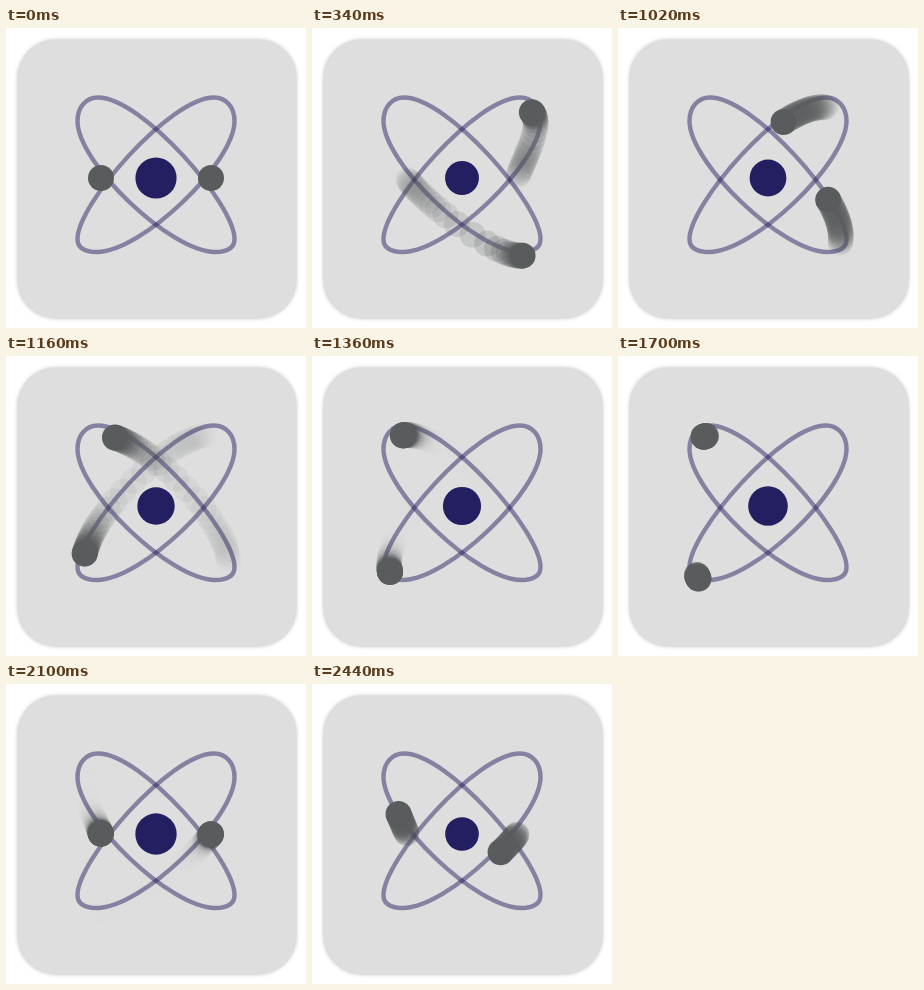
An HTML page with a canvas that plays this animation: 300x300 px, repeating every 2.46 s.

```html
<!DOCTYPE html>
<html lang="en">
<head>
<meta charset="utf-8">
<title>Atom</title>
<style>
  html, body { margin: 0; width: 100%; height: 100%; overflow: hidden; background: #fff; }
  .stage { position: relative; width: 300px; height: 300px; overflow: hidden; }
  .card {
    position: absolute; left: 11.5px; top: 11.5px; width: 278px; height: 278px;
    border-radius: 38px; background: #dedede; box-shadow: 0 0 4px rgba(0, 0, 0, .3);
  }
  svg, canvas { position: absolute; left: 0; top: 0; width: 300px; height: 300px; }
  .orbit { fill: none; stroke: #221c5f; stroke-opacity: .48; stroke-width: 4.4; }
</style>
</head>
<body>
<div class="stage">
  <div class="card"></div>
  <svg viewBox="0 0 300 300">
    <path id="orbit" class="orbit" d="M71.5 211C71.5 176 164 69.5 208 69.5C220 69.5 228.5 79 228.5 93C228.5 135 135.5 224 91 224C78 224 71.5 220 71.5 211Z"/>
    <use href="#orbit" transform="matrix(-1 0 0 1 300 0)"/>
    <circle id="nucleus" cx="150" cy="150" r="20.6" fill="#231f60"/>
  </svg>
  <canvas id="view" width="300" height="300"></canvas>
</div>
<script>
  const SIZE = 300, LOOP = 2460, BEAT = 2160;
  const STEP = 6, FADE = 55, TRAIL = 330;
  const ctx = document.getElementById('view').getContext('2d');
  const nucleus = document.getElementById('nucleus');

  // Home, far corner, near corner, home, with two handles in between.
  const left = [
    [95, 150], [110, 174], [212, 254],
    [221, 219], [238, 176], [130, 68],
    [88, 80], [66, 86], [79, 112],
    [95, 150]
  ];
  // The other electron runs the mirrored route the other way round.
  const right = left.map(([x, y]) => [SIZE - x, y]).reverse();
  const stops = [0, 595, 1560, 2140];

  const cubic = (s, a, b, c, d) => {
    const r = 1 - s;
    return r * r * r * a + 3 * r * r * s * b + 3 * r * s * s * c + s * s * s * d;
  };

  // cubic-bezier(.86, 0, .07, 1)
  function ease(x) {
    if (x <= 0) return 0;
    if (x >= 1) return 1;
    let lo = 0, hi = 1;
    for (let i = 0; i < 20; i++) {
      const mid = (lo + hi) / 2;
      if (cubic(mid, 0, .86, .07, 1) < x) lo = mid; else hi = mid;
    }
    return cubic(lo, 0, 0, 1, 1);
  }

  // After one beat the motion plays backwards.
  function place(route, time) {
    const t = BEAT - Math.abs(BEAT - time);
    const i = t < stops[1] ? 0 : t < stops[2] ? 1 : 2;
    const u = ease((t - stops[i]) / (stops[i + 1] - stops[i]));
    const leg = route.slice(3 * i, 3 * i + 4);
    return [0, 1].map(axis => cubic(u, ...leg.map(p => p[axis])));
  }

  function disc([x, y], alpha) {
    ctx.globalAlpha = alpha;
    ctx.beginPath();
    ctx.arc(x, y, 13, 0, Math.PI * 2);
    ctx.fill();
  }

  function electron(route, t) {
    const first = Math.ceil(Math.max(0, t - TRAIL) / STEP) * STEP;
    for (let s = first; s < t; s += STEP) {
      disc(place(route, s), .5 * Math.exp((s - t) / FADE));
    }
    disc(place(route, t), 1);
  }

  function radius(t) {
    const u = t % BEAT, dip = 270;
    if (u < dip) return 18.7 + 1.9 * Math.cos(Math.PI * u / dip);
    return 16.8 + 4 * (u - dip) / (BEAT - dip);
  }

  function draw(t) {
    nucleus.setAttribute('r', radius(t));
    ctx.clearRect(0, 0, SIZE, SIZE);
    ctx.fillStyle = '#595c5d';
    electron(left, t);
    electron(right, t);
  }

  let origin;
  function tick(now) {
    if (origin === undefined) origin = now;
    draw((now - origin) % LOOP);
    requestAnimationFrame(tick);
  }
  draw(0);
  requestAnimationFrame(tick);
</script>
</body>
</html>
```
